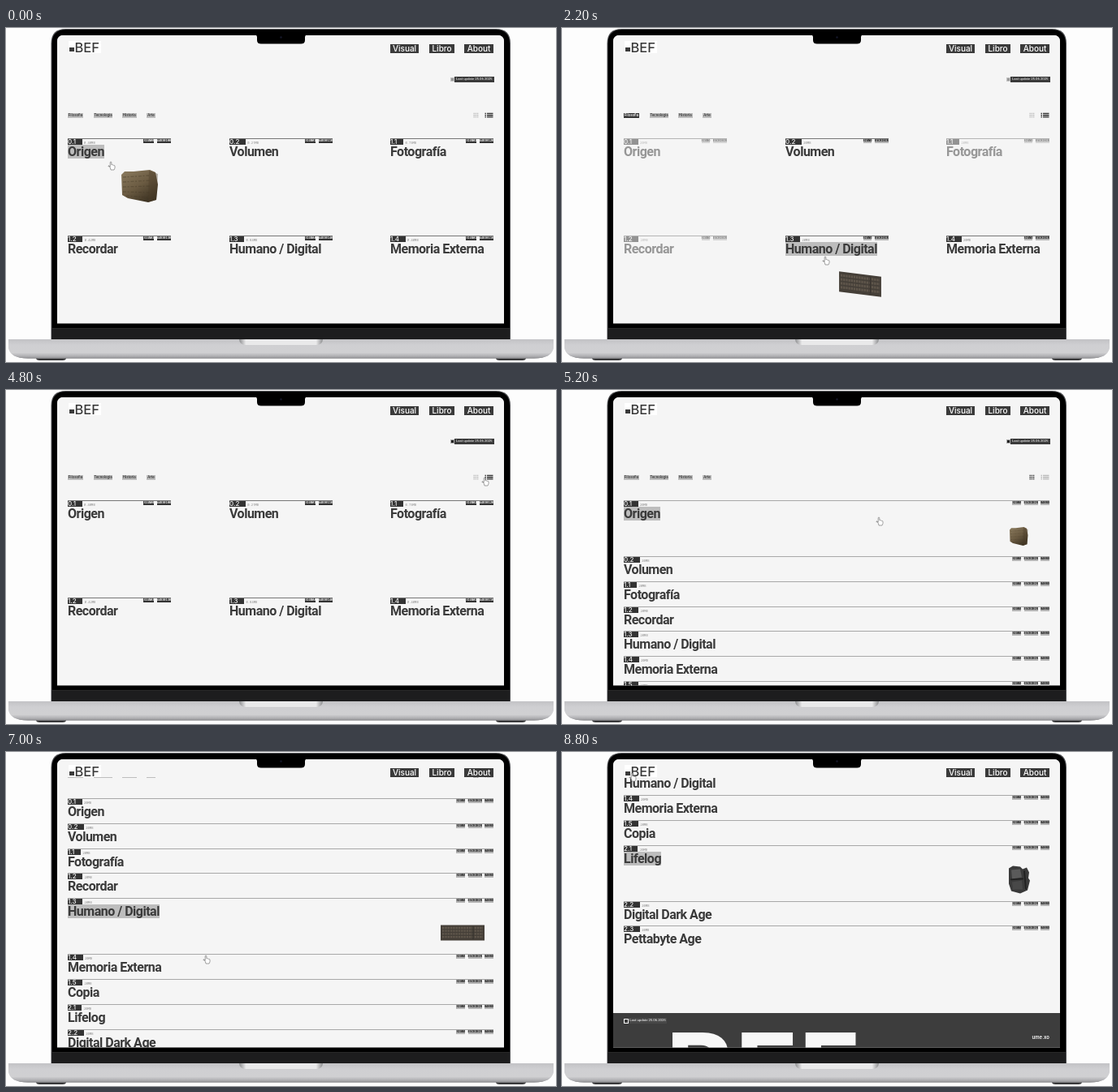
These frames come from a looping animation (677x412 px, 8.9 s). An HTML page:

```html
<!DOCTYPE html>
<html lang="es">
<head>
<meta charset="utf-8">
<title>Archivo</title>
<style>
html, body { margin: 0; width: 100%; height: 100%; overflow: hidden; background: #fdfdfd; }
#stage { position: relative; width: 677px; height: 412px; overflow: hidden; color: #3a3a3a; font-family: Inter, sans-serif; }
#stage * { position: absolute; white-space: nowrap; }
#stage svg * { position: static; }
#body, #front { left: 0; top: 0; }
#screen { inset: 0; background: #f5f5f5; clip-path: inset(9px 64px 47.5px 63px round 7px 7px 0 0); }
#page, #list, #grid { left: 0; top: 0; width: 677px; height: 412px; }
#head { left: 63px; top: 0; width: 550px; height: 31px; background: #f5f5f5; }
#logo { left: 14px; top: 16px; width: 40px; height: 15px; background: #fff; }
#logo i { left: 1px; top: 7.5px; width: 5.5px; height: 5.5px; background: #3a3a3a; }
#logo span { left: 7.5px; top: -2px; font: 500 16.5px/20px Inter, sans-serif; }
.nav { top: 20px; height: 11px; background: #3a3a3a; color: #fff; font: 500 10px/11px Inter, sans-serif; text-align: center; }
.badge { height: 6.5px; font: 400 4.4px/6.5px Roboto, sans-serif; letter-spacing: -.08px; color: #fff; background: #3a3a3a; text-align: center; }
.dot { width: 5px; height: 5px; box-sizing: border-box; border: 1.4px solid #c4c4c4; background: #999; }
.dot.on { border-color: #aaa; background: #222; }
.filter { top: 104.7px; height: 6px; background: #bdbdbd; font: 500 4.5px/6px Roboto, sans-serif; text-align: center; }
.filter.on { background: #333; color: #fff; }
.item { left: 0; top: 0; height: 25px; box-sizing: border-box; border-top: 1px solid #777; }
#list .item { border-color: #a8a8a8; }
.meta { left: 0; top: 0; height: 7px; display: flex; }
#stage .meta *, #stage .tags * { position: static; }
.num { height: 7px; padding-right: 7.5px; background: #333; color: #f5f5f5; font: 500 8px/7.4px Inter, sans-serif; overflow: hidden; }
.size { margin-left: 2.5px; color: #8a8a8a; font: 3.8px/10px "Noto Sans Mono", monospace; }
.tags { right: 0; top: 0; display: flex; gap: 3.4px; }
.tags span { height: 4.5px; background: #333; color: #f0f0f0; font: 700 3.6px/4.5px "Noto Sans Mono", monospace; }
#list .tags span, .alt .tags span { background: #b4b4b4; color: #111; }
.title { left: 0; top: 6.8px; font: 600 16px/17px Roboto, sans-serif; letter-spacing: -.5px; }
.title.on { background: #bdbdbd; }
.pic { left: 0; top: 0; width: 60px; height: 44px; overflow: visible; }
#foot { left: 63px; top: 559px; width: 550px; height: 130px; background: #3d3d3d; color: #fff; overflow: hidden; }
#big { left: 64.5px; top: 7.3px; font: 700 129px/1 Inter, sans-serif; color: #f7f7f7; }
#link { right: 13px; top: 25px; font: 600 6px/9px Inter, sans-serif; }
#foot .dot { left: 13px; top: 6.5px; width: 6px; height: 6px; border-color: #ddd; background: #888; }
#foot .dot.on { border-color: #fff; background: #3d3d3d; }
.cur { left: 0; top: 0; width: 12px; height: 12px; overflow: visible; }
.cur path { fill: #fff; stroke: #777; stroke-width: .7; }
</style>
</head>
<body>
<div id="stage">
  <svg id="body" width="677" height="412">
    <defs>
      <linearGradient id="metal" x2="0" y2="1">
        <stop offset="0" stop-color="#c2c2c5"/><stop offset=".3" stop-color="#cfcfd2"/>
        <stop offset=".7" stop-color="#d0d0d2"/><stop offset=".9" stop-color="#adadb0"/>
        <stop offset="1" stop-color="#8c8c8f"/>
      </linearGradient>
      <linearGradient id="ends">
        <stop offset="0" stop-color="#666" stop-opacity=".5"/><stop offset=".015" stop-color="#fff" stop-opacity=".45"/>
        <stop offset=".06" stop-color="#fff" stop-opacity="0"/><stop offset=".94" stop-color="#fff" stop-opacity="0"/>
        <stop offset=".985" stop-color="#fff" stop-opacity=".45"/><stop offset="1" stop-color="#666" stop-opacity=".5"/>
      </linearGradient>
      <linearGradient id="lip">
        <stop offset="0" stop-color="#8b8c8e"/><stop offset=".08" stop-color="#e9e9ea"/>
        <stop offset=".92" stop-color="#e9e9ea"/><stop offset="1" stop-color="#8b8c8e"/>
      </linearGradient>
      <linearGradient id="stone" x2=".7" y2="1">
        <stop offset="0" stop-color="#8d7d60"/><stop offset=".55" stop-color="#6b5b42"/><stop offset="1" stop-color="#3c3222"/>
      </linearGradient>
      <symbol id="rock" overflow="visible">
        <path d="M-22-14L-18-18-7-18 13-20 20-17 23-2 21 17 11 20-14 15-21 11Z" fill="url(#stone)"/>
        <path d="M12-19L23-15 21 17 11 20Z" fill="#4b3e2a" opacity=".4"/>
        <path d="M-20-11L12-13M-20-5L14-7M-20 1L13 0M-20 7L13 8M-16 12L11 14" stroke="#463a27" stroke-width="1.3" stroke-dasharray="4 1.5 2 2" opacity=".4"/>
      </symbol>
      <symbol id="keys" overflow="visible">
        <path d="M-27-9.5H27V9.5H-27Z" fill="#453f38"/>
        <path d="M-25-6H25M-25-2.3H25M-25 1.4H25M-25 5.1H25" stroke="#5f564b" stroke-width="2.3" stroke-dasharray="2.4 .9"/>
        <path d="M13-8V8" stroke="#39342f" stroke-width="1.5"/>
      </symbol>
      <symbol id="books" overflow="visible">
        <path d="M-10-16L2-14 9-8 8 13-5 16-10 13Z" fill="#55493a"/>
        <path d="M-8-14V13M-1-12V13M5-8V11" stroke="#cdbf9d" stroke-width="2"/>
        <path d="M-4-14V14M2-12V12" stroke="#29231c" stroke-width="1.6"/>
      </symbol>
      <symbol id="device" overflow="visible">
        <path d="M-12-14L-7-17 2-16 5-13 10-15 13-9 12-2 14 1 11 13 2 17-9 14-12 5Z" fill="#3a3a3a"/>
        <path d="M-9-12L2-13 4-3-8-1Z" fill="#5a5a5a"/><path d="M-8 3L4 1 5 12-7 12Z" fill="#484848"/>
        <path d="M7-11L9 12M-10 0L6-1" stroke="#202020" stroke-width="1.8"/>
      </symbol>
    </defs>
    <path d="M55.5 385V19Q55.5 1 73.5 1H603Q621 1 621 19V385Z" fill="#4e4f52"/>
    <path d="M56.5 385V19.5Q56.5 2 74 2H602.5Q620 2 620 19.5V385Z" fill="#000"/>
    <path d="M56.5 371H620V385H56.5Z" fill="#1d1d1e"/><path d="M56.5 370.5H620" stroke="#333" stroke-width=".8"/>
    <path d="M37 406H74V408Q73 410 70 410H41Q38 410 37 408ZM603 406H640V408Q639 410 636 410H607Q604 410 603 408Z" fill="#39393b"/>
    <path id="slab" d="M3 384H674V394Q672 407.5 650 407.5H27Q5 407.5 3 394Z"/>
    <use href="#slab" fill="url(#ends)"/>
    <path d="M287 384H390Q389.500 391 382 391H295Q287.500 391 287 384Z" fill="url(#lip)"/>
  </svg>
  <style>#slab { fill: inherit; } #body > #slab { fill: url(#metal); } #body > use { fill: url(#ends); }</style>

  <div id="screen">
    <div id="page">
      <i class="dot" id="live" style="left:547px;top:60.8px"></i>
      <div class="badge" style="left:552px;top:60px;width:48.500px">Last update 25.06.2025</div>
      <div id="filters"></div>
      <svg style="left:0;top:0" width="677" height="130">
        <path id="icoGrid" d="M575.500 105.500h6M575.500 107.700h6M575.500 109.900h6" stroke="#333" stroke-width="1.400" stroke-dasharray="1.400 .8"/>
        <path id="icoList" d="M589.500 105.500h1.500m1 0h7.500M589.500 107.700h1.500m1 0h7.500M589.500 109.900h1.500m1 0h7.500" stroke="#333" stroke-width="1.400"/>
      </svg>
      <div id="grid"></div>
      <div id="list">
        <div id="foot">
          <i class="dot" id="footDot"></i>
          <div class="badge" style="left:19.500px;top:6.300px;width:46px;background:#484848">Last update 25.06.2025</div>
          <div id="big">BEF</div>
          <div id="link">ume.xo</div>
        </div>
      </div>
    </div>
    <div id="head">
      <div id="logo"><i></i><span>BEF</span></div>
      <div class="nav" style="left:410px;width:35px">Visual</div>
      <div class="nav" style="left:458px;width:31px">Libro</div>
      <div class="nav" style="left:501px;width:36px">About</div>
    </div>
    <svg class="cur" id="arrow"><path d="M-2.500-4.500V3.200L-.7 1.700.6 4.600 1.900 4 .7 1.200H3Z"/></svg>
    <svg class="cur" id="hand"><path d="M-1.800 1.200V-4Q-1.800-5-1-5T-.2-4V-1.300Q.8-2 1.300-1Q2.300-1.500 2.700-.5Q4-.8 4 .6V2.500Q3.600 4 3 5H-1Q-2-.2-4 .8Q-4.300-.3-3.300-.2Z"/></svg>
  </div>
  <svg id="front" width="677" height="30">
    <path d="M307 8.500H370Q368 9 368 11V15Q368 19.500 363 19.500H314Q309 19.500 309 15V11Q309 9 307 8.500Z" fill="#000"/>
    <circle cx="338.500" cy="11.500" r="1.200" fill="#15182a"/>
  </svg>
</div>

<script>
const LOOP = 8900, STEP = 100, TOP = 136, ROW = 30.8, OPEN = 38.2;
const $ = id => document.getElementById(id);
const names = ["Origen", "Volumen", "Fotografía", "Recordar", "Humano / Digital",
  "Memoria Externa", "Copia", "Lifelog", "Digital Dark Age", "Pettabyte Age"];
const nums = ["0.1", "0.2", "1.1", "1.2", "1.3", "1.4", "1.5", "2.1", "2.2", "2.3"];
const sizes = ["0.40MB", "0.27MB", "0.73MB", "0.42MB", "0.84MB", "0.40MB"];
const pics = ["rock", "device", "device", "books", "keys", "device", "books", "device", "books", "books"];
const dimmed = [0, 2, 3];

// Timelines: [ms, value...]
const cursor = [[0, 130, 170], [600, 86, 111], [900, 86, 111], [1300, 116, 150], [1400, 116, 150],
  [2200, 325, 287], [2300, 115, 201], [2400, 95, 188], [2500, 95, 188], [3100, 88, 104], [3300, 88, 104],
  [3700, 500, 124], [4200, 588, 115], [4500, 589, 114], [4600, 589, 114], [4800, 590, 113], [4900, 590, 113],
  [5200, 391, 162], [5800, 300, 250], [7000, 247, 256], [7500, 233, 168], [8100, 233, 168], [8800, 87, 31]];
const pointer = [[0, 1], [200, 0], [500, 1], [1100, 0], [2000, 1], [2300, 0], [2900, 1], [3400, 0], [4100, 1], [7100, 0], [8200, 1]];
const scroll = [[5800, 0], [6600, 79], [7000, 79], [7450, 237]];
const gridHover = [[0, 0], [200, -1], [2000, 4], [2300, -1]];
const listHover = [[0, 0], [5400, 1], [5700, 2], [6100, 3], [6500, 4], [7100, 5], [7200, 7], [7300, 8], [7400, 9], [8300, 8], [8500, 7]];

const clamp = v => Math.max(0, Math.min(1, v));
function tween(keys, t) {
  const n = keys.findIndex(k => k[0] > t);
  if (n === 0) return keys[0].slice(1);
  if (n < 0) return keys[keys.length - 1].slice(1);
  const a = keys[n - 1], b = keys[n], p = (t - a[0]) / (b[0] - a[0]);
  return a.slice(1).map((v, i) => v + (b[i + 1] - v) * p);
}
const lastIndex = (keys, t) => keys.filter(k => k[0] <= t).length - 1;
const hold = (keys, t) => keys[lastIndex(keys, t)][1];
const move = (el, x, y) => el.style.transform = `translate(${x}px,${y}px)`;

function add(parent, cls, html) {
  const el = document.createElement("div");
  el.className = cls;
  el.innerHTML = html;
  parent.append(el);
  return el;
}
function makeItem(parent, i, width, tags, look) {
  const el = add(parent, "item", `<div class="meta"><span class="num">${nums[i]}</span><span class="size">20MB</span></div>
    <div class="tags">${tags.map(s => `<span>${s}</span>`).join("")}</div><div class="title">${names[i]}</div>`);
  el.style.width = width + "px";
  const holder = document.createElement("div");
  holder.innerHTML = `<svg class="pic"><use href="#${pics[i]}" transform="${look}"/></svg>`;
  const pic = holder.firstChild;
  parent.append(pic);
  return { el, pic, title: el.querySelector(".title"), size: el.querySelector(".size"), tags: el.querySelectorAll(".tags span") };
}

const filters = [["Filosofia", 76, 19], ["Tecnologia", 108, 23], ["Historia", 143, 17.5], ["Arte", 173, 11]].map(([s, x, w]) => {
  const el = add($("filters"), "filter", s);
  el.style.left = x + "px";
  el.style.width = w + "px";
  return el;
});
const cells = sizes.map((s, i) => {
  const cell = makeItem($("grid"), i, 127, ["", ""], i === 4 ? "matrix(.96 .12 0 1.32 0 0)" : "");
  move(cell.el, [76, 275, 473][i % 3], i < 3 ? TOP : TOP + 120);
  return cell;
});
const rows = names.map((s, i) => makeItem($("list"), i, 524, ["SIGNO", "ESCRIBIR", "BARRO"], i ? "" : "scale(.5 .57)"));

function drawGrid(t, x, y) {
  const filtered = t >= 1000 && t < 3400, hover = hold(gridHover, t);
  const fade = clamp((t - 900) / 400) * (1 - clamp((t - 3300) / 300));
  $("grid").classList.toggle("alt", filtered);
  filters[0].classList.toggle("on", filtered);
  cells.forEach((c, i) => {
    c.el.style.opacity = dimmed.includes(i) ? 1 - .5 * fade : 1;
    c.size.textContent = filtered ? "20MB" : sizes[i];
    c.tags[0].textContent = filtered ? "SIGNO" : "S1GN0" + i;
    c.tags[1].textContent = filtered ? "ESCRIBIR" : "448301" + i + "0";
    c.title.classList.toggle("on", i === hover);
    c.pic.style.display = i === hover ? "" : "none";
    move(c.pic, x + (i ? 42 : 34), y + (i ? 29 : 25));
  });
}

function drawList(t) {
  const n = lastIndex(listHover, t), now = listHover[n][1], was = n ? listHover[n - 1][1] : -1;
  const p = clamp((t - listHover[n][0] + 100) / 200);
  let y = TOP;
  rows.forEach((r, i) => {
    const open = i === now ? p : i === was ? 1 - p : 0;
    move(r.el, 76, Math.round(y));
    move(r.pic, 562, y + (i ? 42.8 : 44.5));
    r.pic.style.opacity = open;
    r.title.classList.toggle("on", i === now);
    y += ROW + OPEN * open;
  });
}

function draw(t) {
  const [x, y] = tween(cursor, t), listed = t >= 5000, hand = hold(pointer, t);
  $("grid").style.display = listed ? "none" : "";
  $("list").style.display = listed ? "" : "none";
  $("icoGrid").style.opacity = listed ? 1 : .3;
  $("icoList").style.opacity = listed ? .3 : 1;
  $("live").classList.toggle("on", t >= 3400);
  $("footDot").classList.toggle("on", t >= 8200);
  move($("page"), 0, -Math.round(tween(scroll, t)[0]));
  drawGrid(t, x, y);
  if (listed) drawList(t);
  $("hand").style.display = hand ? "" : "none";
  $("arrow").style.display = hand ? "none" : "";
  move($("hand"), x, y);
  move($("arrow"), x, y);
}

let shown = -1;
function tick() {
  const t = Math.floor(performance.now() % LOOP / STEP) * STEP;
  if (t !== shown) draw(shown = t);
  requestAnimationFrame(tick);
}
tick();
</script>
</body>
</html>
```
